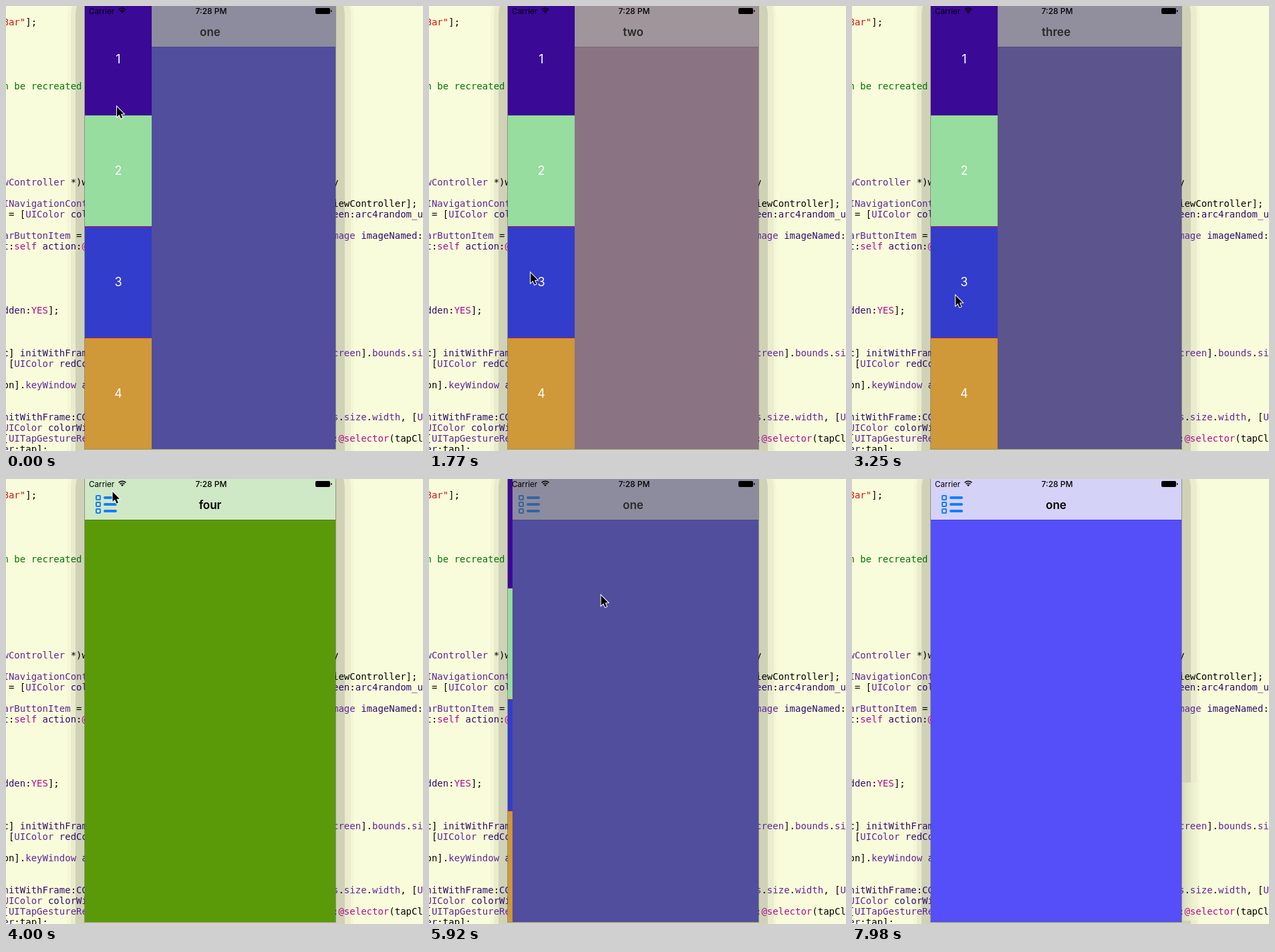
Write an HTML page with a canvas that moves like this. It is 624 px wide and 667 px high and loops after 8570 ms.

```html
<!DOCTYPE html>
<html lang="en">
<head>
<meta charset="utf-8">
<title>Side menu</title>
<style>
html, body { margin: 0; width: 624px; height: 667px; overflow: hidden; }
canvas { display: block; }
</style>
</head>
<body>
<canvas id="stage" width="624" height="667"></canvas>
<script>
const ctx = document.getElementById('stage').getContext('2d');
const LOOP = 8570, STEP = LOOP / 58, SLIDE = 500;
const LEFT = 118, RIGHT = 493, BOTTOM = 664, MENU = 100;
const UI = 'Inter, "Open Sans", sans-serif';
const INK = { k: '#000', p: '#5c2699', d: '#2e0d6e', m: '#aa0d91', r: '#c41a16', g: '#007400' };

// Code lines: row centre, then coloured runs (first letter picks the ink).
const leftCode = [
  [24, 'rBar"|k];'], [120, 'gn be recreated'], [264, 'pwController|k *)w'],
  [296, 'pINavigationCont'], [312, 'k = [|pUIColor|d col'], [344, 'parButtonItem|k ='],
  [360, 'dt|k:|mself|d action|k:|m@'], [456, 'ddden|k:|mYES|k];'],
  [520, 'kc] |dinitWithFram'], [536, 'k [|pUIColor|d redCo'], [568, 'kon].|pkeyWindow|d a'],
  [616, 'dnitWithFrame|k:|dCG'], [632, 'pUIColor|d colorWi'], [648, 'k[|pUITapGestureRe'],
  [664, 'der|k:tap];']
];
const rightCode = [
  [264, 'ky'], [296, 'kiewController];'], [312, 'deen|k:|darc4random_u'],
  [344, 'pmage|d imageNamed|k:'], [520, 'pcreen|k].|pbounds|k.|psi'],
  [616, 'ps|k.|psize|k.|pwidth|k, [|pU'], [648, 'd:|m@selector|k(tapCl']
];

const pages = [
  { title: 'one', body: '#544ff8', bar: '#d4d2f7' },
  { title: 'two', body: '#ce9ebf', bar: '#fce5f2' },
  { title: 'three', body: '#6b5bd2', bar: '#dbd6f8' },
  { title: 'four', body: '#5a9a08', bar: '#cfe8c6' }
];
const cells = ['#3a0996', '#96dd9f', '#333dcb', '#cf9838'];

// Time, menu open or not, page shown from then on.
const events = [
  [-1000, true, 0], [400, false, 1], [1140, true, 1], [2030, false, 2], [2760, true, 2],
  [3440, false, 3], [4250, true, 3], [5130, false, 0], [5830, true, 0], [6450, false, 0]
];
const presses = [[1020, 1300], [2600, 2900], [4120, 4400], [5700, 5850]];

// Pointer: time, x, y.
const path = [
  [0, 166, 151], [140, 164, 248], [430, 164, 248], [880, 150, 62], [1030, 143, 40],
  [1185, 143, 40], [1330, 146, 80], [1740, 152, 400], [2060, 152, 400], [2510, 151, 80],
  [2650, 155, 26], [2800, 155, 26], [3390, 155, 560], [3470, 155, 560], [3850, 158, 120],
  [3980, 160, 18], [4140, 152, 36], [4430, 150, 38], [4870, 154, 119], [5150, 156, 110],
  [5740, 152, 40], [5800, 152, 40], [5905, 256, 173], [6360, 387, 306], [7280, 387, 306],
  [7830, 490, 455]
];

const mix = (a, b, k) => a + (b - a) * k;
const clamp = k => Math.min(1, Math.max(0, k));
const ease = k => k * k * (3 - 2 * k);

function rect(color, x, y, w, h) {
  ctx.fillStyle = color;
  ctx.fillRect(x, y, w, h);
}

function rounded(x, y, w, h, r) {
  ctx.beginPath();
  ctx.roundRect(x, y, w, h, r);
}

function text(str, x, y, font, color = '#000', align = 'center') {
  ctx.font = font + ' ' + UI;
  ctx.fillStyle = color;
  ctx.textAlign = align;
  ctx.fillText(str, x, y);
}

function code(lines, left) {
  ctx.font = '14px "DejaVu Sans Mono", monospace';
  ctx.textAlign = 'left';
  for (const [y, line] of lines) {
    let x = left;
    for (const run of line.split('|')) {
      const str = run.slice(1);
      ctx.fillStyle = INK[run[0]];
      ctx.fillText(str, x, y + 5);
      x += ctx.measureText(str).width;
    }
  }
}

function backdrop(t) {
  rect('#f9fcda', 0, 0, 624, 667);
  for (const [x, right, alpha] of [[92, 520, .02], [97, 516, .045], [104, 507, .11]]) {
    rounded(x, -36, right - x, 760, 50);
    ctx.fillStyle = `rgba(0,0,0,${alpha})`;
    ctx.fill();
  }
  if (t > 7900) {
    const fade = ctx.createLinearGradient(RIGHT, 0, 520, 0);
    fade.addColorStop(0, '#d6d9bb');
    fade.addColorStop(.5, '#e9eccb');
    fade.addColorStop(1, '#f6f9d8');
    rect(fade, RIGHT, 455, 27, 207);
  }
  code(leftCode, -4.5);
  code(rightCode, 489);
  rect('rgba(70,70,70,.45)', LEFT - 1, 0, RIGHT - LEFT + 2, BOTTOM + 1);
}

function listIcon(pressed) {
  ctx.globalAlpha = pressed ? .25 : 1;
  ctx.strokeStyle = '#157efb';
  ctx.lineCap = 'round';
  for (const y of [28, 38, 48]) {
    ctx.lineWidth = 2;
    rounded(135, y - 3, 6, 6, 1);
    ctx.stroke();
    ctx.lineWidth = 4;
    ctx.beginPath();
    ctx.moveTo(148, y);
    ctx.lineTo(164, y);
    ctx.stroke();
  }
  ctx.globalAlpha = 1;
}

function drawMenu(width) {
  const x = LEFT + width - MENU;
  rect('#c8142c', x, 0, MENU, BOTTOM);
  cells.forEach((color, i) => {
    const y = [0, 164, 331, 498][i];
    rect(color, x, y, MENU, [164, 166, 166, 166][i]);
    text(i + 1, x + 50, 86 + i * 167, '18px', '#fff');
  });
  rect('#c8142c', x, 330, MENU, 1);
  rect('#c8142c', x, 497, MENU, 1);
}

function statusBar() {
  text('Carrier', 124, 11.5, '11.7px', '#000', 'left');
  text('7:28 PM', 307, 11.5, '500 12px');
  ctx.strokeStyle = '#000';
  ctx.lineCap = 'butt';
  ctx.lineWidth = 1.6;
  for (const r of [4.8, 7.7]) {
    ctx.beginPath();
    ctx.arc(174, 11, r, -Math.PI * .75, -Math.PI * .25);
    ctx.stroke();
  }
  ctx.fillStyle = '#000';
  ctx.beginPath();
  ctx.moveTo(174, 11);
  ctx.arc(174, 11, 2.8, -Math.PI * .75, -Math.PI * .25);
  ctx.fill();
  rounded(463, 3, 22, 9, 2);
  ctx.fill();
  rounded(486, 6, 1.5, 3, .7);
  ctx.fill();
}

function phone(t) {
  const [start, open, index] = events.findLast(e => e[0] <= t);
  const page = pages[index];
  const slid = ease(clamp((t - start) / SLIDE));
  const width = MENU * (open ? slid : 1 - slid);
  ctx.save();
  ctx.beginPath();
  ctx.rect(LEFT, 0, RIGHT - LEFT, BOTTOM);
  ctx.clip();
  rect(page.body, LEFT, 0, RIGHT - LEFT, BOTTOM);
  rect(page.bar, LEFT, 0, RIGHT - LEFT, 61);
  rect('rgba(0,0,0,.25)', LEFT, 61, RIGHT - LEFT, .7);
  text(page.title, 305.5, 45, '600 17px');
  listIcon(presses.some(([a, b]) => t >= a && t < b));
  if (open) rect('rgba(78,78,78,.524)', LEFT, 0, RIGHT - LEFT, BOTTOM);
  if (width > 0) drawMenu(width);
  statusBar();
  ctx.restore();
}

function pointer(t) {
  if (t > 7900) return;
  const next = path.findIndex(p => p[0] > t);
  const b = path[next < 0 ? path.length - 1 : next];
  const a = next < 0 ? b : path[next - 1];
  const k = a === b ? 0 : (t - a[0]) / (b[0] - a[0]);
  ctx.save();
  ctx.translate(mix(a[1], b[1], k), mix(a[2], b[2], k));
  ctx.beginPath();
  for (const [x, y] of [[0, 0], [0, 15], [3.4, 11.8], [6, 17.6], [8.4, 16.5], [5.9, 10.9], [10.4, 10.6]]) {
    ctx.lineTo(x, y);
  }
  ctx.closePath();
  ctx.lineWidth = 2;
  ctx.lineJoin = 'miter';
  ctx.strokeStyle = '#fff';
  ctx.stroke();
  ctx.fillStyle = '#000';
  ctx.fill();
  ctx.restore();
}

function draw() {
  const t = Math.floor((performance.now() % LOOP + 5) / STEP) % 58 * STEP;
  backdrop(t);
  phone(t);
  pointer(t);
  requestAnimationFrame(draw);
}
draw();
</script>
</body>
</html>
```
